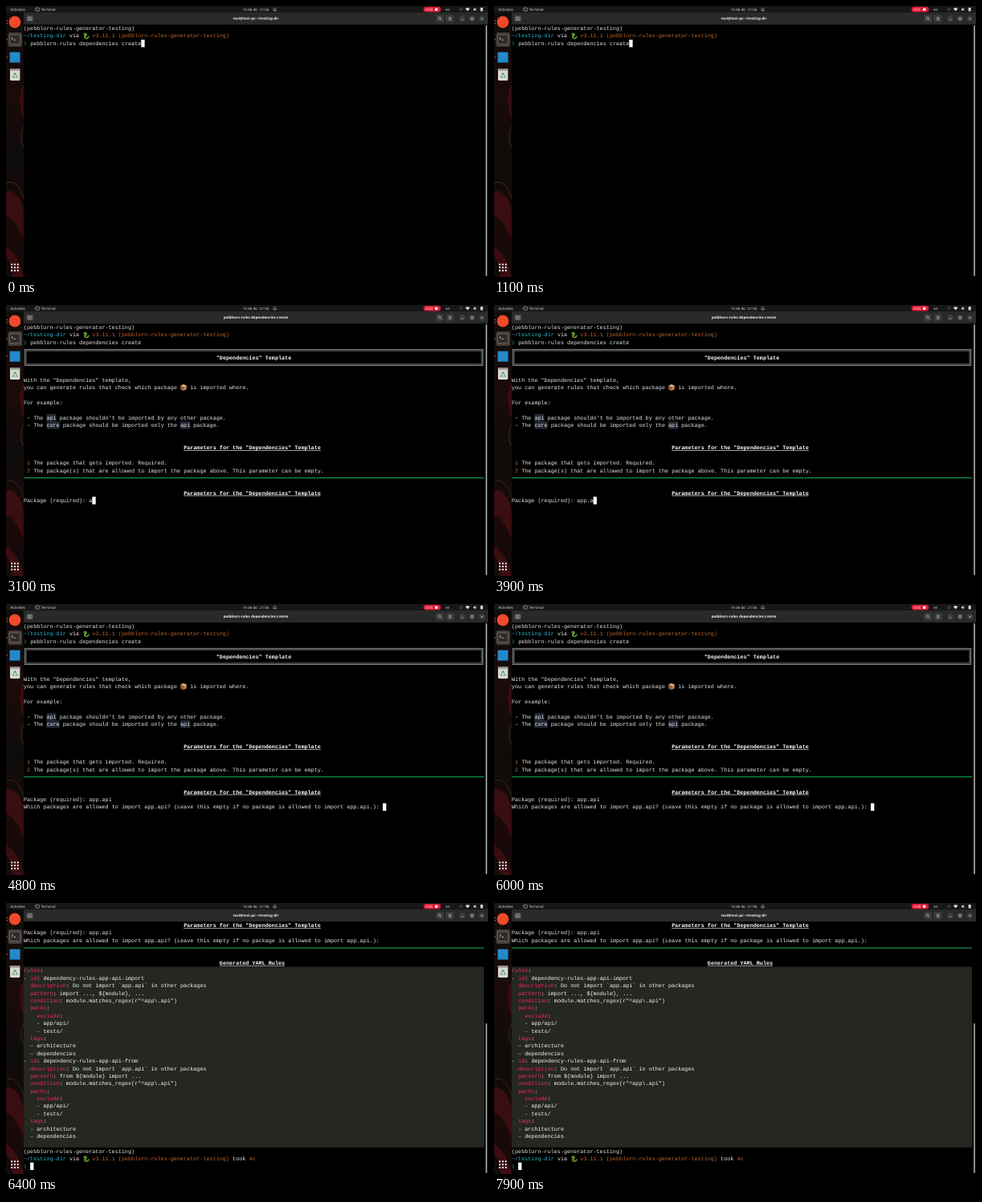
Write an HTML page that moves like this. It is 600 px wide and 338 px high and loops after 8100 ms.

```html
<!DOCTYPE html>
<html lang="en">
<head>
<meta charset="utf-8">
<title>Terminal session</title>
<style>
html, body { margin: 0; width: 100%; height: 100%; overflow: hidden; background: #000; }
svg { display: block; width: 100%; height: 100%; }
text { text-rendering: geometricPrecision; white-space: pre; }
.mono { font: 6.773px "Liberation Mono", monospace; }
.ui { font: 4.5px "Open Sans", "Noto Sans", sans-serif; fill: #e6e6e6; }
.bold { font-weight: 700; }
</style>
</head>
<body>
<svg viewBox="0 0 600 338">
  <defs>
    <linearGradient id="wall" x1="0" y1="0" x2="0" y2="1">
      <stop offset="0" stop-color="#100d0b"/>
      <stop offset=".3" stop-color="#1a0b0a"/>
      <stop offset=".55" stop-color="#0e0c0a"/>
      <stop offset=".85" stop-color="#1b0909"/>
      <stop offset="1" stop-color="#0e0b0a"/>
    </linearGradient>
    <clipPath id="dockClip"><rect y="8" width="22" height="330"/></clipPath>
    <clipPath id="termClip"><rect x="22" y="23.2" width="573.5" height="314.8"/></clipPath>
    <g id="snake" fill="none" stroke-linecap="round">
      <path d="M2 2.4C4 .4 6 2.4 4.2 4S2 6.6 4 7.2S7.4 6.8 7.6 5.4" stroke="#5f9e2f" stroke-width="1.7"/>
      <path d="M2.6 3.2C4 2.6 3.6 4.2 3 5" stroke="#e2b93b" stroke-width=".7"/>
    </g>
    <g id="box">
      <path d="M.3 2L4 .5L7.8 2V6.6L4 8.3L.3 6.6Z" fill="#b47a48"/>
      <path d="M.3 2L4 3.5V8.3L.3 6.6Z" fill="#8e5a34"/>
      <path d="M.3 2L4 .5L7.8 2L4 3.5Z" fill="#d2a06c"/>
      <path d="M2.2 1.2L5.9 2.7V4.2" fill="none" stroke="#ecd3a8" stroke-width=".7"/>
    </g>
  </defs>

  <rect width="600" height="338"/>

  <g clip-path="url(#dockClip)">
    <rect y="8" width="22" height="330" fill="url(#wall)"/>
    <path d="M22 98C14 112 18 130 22 142Z M0 232C8 226 20 240 22 258V292C14 270 4 262 0 262Z M0 300C9 306 18 318 22 338H8C7 322 2 314 0 312Z" fill="#3a0d10"/>
    <path d="M22 150C17 160 18 168 22 176M0 222C9 214 18 226 22 240" fill="none" stroke="#4a3a28" stroke-width=".7"/>
  </g>

  <g fill="#e0592a">
    <circle cx="1.4" cy="18.5" r=".8"/><circle cx="1.4" cy="21.8" r=".8"/>
    <circle cx="1.4" cy="42" r=".8"/><circle cx="1.4" cy="64" r=".8"/>
  </g>
  <circle cx="11" cy="20" r="7.4" fill="#f0482a"/>
  <rect x="2.6" y="33" width="17.4" height="18" rx="2.5" fill="#453d38"/>
  <rect x="4.6" y="36" width="13" height="11.6" rx="1.4" fill="#2e2b2b" stroke="#88807a" stroke-width=".6"/>
  <path d="M6.8 39.2l1.8 1.4l-1.8 1.4M9.6 42.4h2.4" fill="none" stroke="#eee" stroke-width=".7"/>
  <rect x="4.6" y="57.6" width="13" height="13" fill="#2489ca"/>
  <rect x="5" y="79" width="12.4" height="14" rx="1.6" fill="#d8d8d4"/>
  <rect x="4.6" y="78" width="13.2" height="2.6" rx="1" fill="#8e8e8a"/>
  <path d="M11.2 83.6L14 88.8H8.4Z" fill="none" stroke="#3c9a52" stroke-width="1.1" stroke-dasharray="3.6 1"/>
  <g id="apps" fill="#f2f2f2"></g>

  <rect width="600" height="8" fill="#171717"/>
  <text class="ui" x="5.5" y="5.9">Activities</text>
  <rect x="36.8" y="2.2" width="4.6" height="4" rx=".6" fill="none" stroke="#ccc" stroke-width=".6"/>
  <path d="M37.8 3.4l.9.8l-.9.8" fill="none" stroke="#ccc" stroke-width=".5"/>
  <text class="ui" x="43.4" y="5.9">Terminal</text>
  <text class="ui" x="311" y="5.9" text-anchor="middle">14 de dic  21:56</text>
  <path d="M332.6 5.4c.8-.8.4-3 2-3s1.200 2.200 2 3zM334 6.2h1.200" fill="none" stroke="#ccc" stroke-width=".6"/>
  <rect x="519.8" y="1" width="21.4" height="6.6" rx="3.300" fill="#df1b36"/>
  <text class="ui" id="timer" x="522.2" y="5.9" style="fill:#fff">0:00</text>
  <rect x="534" y="2.700" width="3.300" height="3.300" rx=".5" fill="#fff"/>
  <text class="ui" x="547.2" y="5.7">en</text>
  <circle cx="566.5" cy="4.200" r="1.500" fill="none" stroke="#777" stroke-width=".6"/>
  <path d="M571.800 3.200L574.600 6.400L577.400 3.200C575.800 1.800 573.400 1.800 571.800 3.200Z" fill="#ddd"/>
  <path d="M581.800 3.400h1.200l1.500-1.300v4.400l-1.500-1.300h-1.200zM585.500 3q1.200 1.300 0 2.600" fill="#ddd"/>
  <rect x="590.6" y="2" width="3" height="4.6" rx=".5" fill="#ddd"/>

  <rect x="22" y="8" width="578" height="15.2" fill="#292929"/>
  <rect x="24.600" y="11" width="10" height="9.600" rx="1.600" fill="#363636"/>
  <path d="M27 13.900h5.200v3.800H27zM29.600 14.800v2M28.600 15.800h2" fill="none" stroke="#ddd" stroke-width=".6"/>
  <text class="ui bold" id="title" x="311" y="17.2" text-anchor="middle" style="fill:#f2f2f2"></text>
  <g fill="#3a3a3a">
    <rect x="535" y="11" width="10" height="9.600" rx="1.600"/>
    <rect x="547.600" y="11" width="10" height="9.600" rx="1.600"/>
    <circle cx="568" cy="15.800" r="3.900"/><circle cx="580.200" cy="15.800" r="3.900"/><circle cx="592.400" cy="15.800" r="3.900"/>
  </g>
  <g fill="none" stroke="#ddd" stroke-width=".6">
    <circle cx="539.600" cy="15.300" r="1.500"/><path d="M540.700 16.400l1.500 1.500"/>
    <path d="M551 14.300h3.400M551 15.800h3.400M551 17.300h3.400"/>
    <path d="M566.600 17h2.800M578.900 14.500h2.600v2.600h-2.600zM591.200 14.600l2.400 2.400M593.600 14.600l-2.400 2.400"/>
  </g>

  <rect id="bar" x="597" width="2" rx="1" fill="#8c8c8c"/>
  <g clip-path="url(#termClip)">
    <g id="shell"></g>
    <g id="intro"></g>
    <g id="yaml"></g>
    <g id="done"></g>
    <rect id="cursor" width="4.3" height="9.39" fill="#fff"/>
  </g>
</svg>
<script>
const NS = 'http://www.w3.org/2000/svg';
const LOOP = 8100, CW = 4.064, RH = 9.39, X0 = 22, Y0 = 23.2, COLS = 141;
const WHITE = '#e8e8e8', CYAN = '#2ab5cf', ORANGE = '#c0672c', GREEN = '#18a558', PINK = '#f92672', CODE = '#f8f8f2';
const ENV = '(pebblorn-rules-generator-testing)';
const CMD = 'pebblorn-rules dependencies create';
const HOME = 'tovi@tovi-pc:~/testing-dir';
const PKG = 'app.api';
const PARAMS = 'Parameters for the "Dependencies" Template';
const ASK = 'Which packages are allowed to import app.api? (Leave this empty if no package is allowed to import app.api.):';

const $ = id => document.getElementById(id);
const colX = c => X0 + c * CW;
const rowY = r => Y0 + r * RH;

function add(parent, tag, attrs) {
  const el = document.createElementNS(NS, tag);
  for (const k in attrs) el.setAttribute(k, attrs[k]);
  return parent.appendChild(el);
}
const rect = (g, x, y, width, height, fill) => add(g, 'rect', { x, y, width, height, fill });

// Every word sits on the character grid.
function put(g, col, row, str, fill = WHITE, bold = false) {
  for (const m of str.matchAll(/\S+/g)) {
    add(g, 'text', { class: bold ? 'mono bold' : 'mono', x: colX(col + m.index), y: rowY(row) + 6.9, fill })
      .textContent = m[0];
  }
}
function heading(g, row, str) {
  const col = Math.floor((COLS - str.length) / 2);
  put(g, col, row, str, '#fff', true);
  rect(g, colX(col), rowY(row) + 7.8, str.length * CW, .7, '#ddd');
}
const rule = (g, row, fill) => rect(g, X0, rowY(row) + 4.1, COLS * CW, 1.1, fill);
function code(g, col, row, str) {
  rect(g, colX(col), rowY(row), str.length * CW, RH, '#222735');
  put(g, col, row, str);
}
function prompt(g, row) {
  put(g, 0, row, ENV);
  put(g, 0, row + 1, '~/testing-dir', CYAN);
  put(g, 14, row + 1, 'via');
  add(g, 'use', { href: '#snake', x: colX(18), y: rowY(row + 1) + .4 });
  put(g, 21, row + 1, 'v3.11.1 ' + ENV, ORANGE);
  add(g, 'path', {
    d: `M${X0 + 1} ${rowY(row + 2) + 2.4}l1.7 2.5l-1.7 2.5`,
    fill: 'none', stroke: GREEN, 'stroke-width': .8
  });
}

for (let i = 0; i < 9; i++) {
  add($('apps'), 'circle', { cx: 7.2 + i % 3 * 3.8, cy: 322.4 + Math.floor(i / 3) * 3.8, r: 1.15 });
}

const shell = $('shell');
prompt(shell, 0);
put(shell, 2, 2, CMD);

const intro = $('intro');
for (const d of [-.8, .9]) {
  add(intro, 'rect', {
    x: colX(.5) + d, y: rowY(3.5) + d, width: 140 * CW - 2 * d, height: 2 * RH - 2 * d,
    fill: 'none', stroke: '#b8b8b8', 'stroke-width': .7
  });
}
put(intro, 59, 4, '"Dependencies" Template', '#fff', true);
put(intro, 0, 7, 'With the "Dependencies" template,');
put(intro, 0, 8, 'you can generate rules that check which package');
add(intro, 'use', { href: '#box', x: colX(48), y: rowY(8) + .3 });
put(intro, 51, 8, 'is imported where.');
put(intro, 0, 10, 'For example:');
for (const r of [12, 13]) add(intro, 'circle', { cx: colX(1.5), cy: rowY(r) + 5, r: .8, fill: '#a98a58' });
put(intro, 3, 12, "The     package shouldn't be imported by any other package.");
code(intro, 7, 12, 'api');
put(intro, 3, 13, 'The      package should be imported only the     package.');
code(intro, 7, 13, 'core');
code(intro, 48, 13, 'api');
heading(intro, 16, PARAMS);
put(intro, 1, 18, '1', ORANGE);
put(intro, 3, 18, 'The package that gets imported. Required.');
put(intro, 1, 19, '2', ORANGE);
put(intro, 3, 19, 'The package(s) that are allowed to import the package above. This parameter can be empty.');
rule(intro, 20, GREEN);
heading(intro, 22, PARAMS);
put(intro, 0, 23, 'Package (required):');
const typed = add(intro, 'text', { class: 'mono', x: colX(20), y: rowY(23) + 6.9, fill: WHITE });
const ask = add(intro, 'g', {});
put(ask, 0, 24, ASK);

const yaml = $('yaml');
rule(yaml, 0, GREEN);
heading(yaml, 2, PARAMS);
put(yaml, 0, 3, 'Package (required): ' + PKG);
put(yaml, 0, 4, ASK);
const lower = rule(yaml, 5, '#8d8d8d');
heading(yaml, 7, 'Generated YAML Rules');
rect(yaml, X0, rowY(8), COLS * CW, 24 * RH, '#252720');
const entry = (kind, pattern) => [
  `- id: dependency-rules-app-api-${kind}`,
  '  description: Do not import `app.api` in other packages',
  `  pattern: ${pattern}`,
  '  condition: module.matches_regex(r"^app\\.api")',
  '  paths:', '    exclude:', '    - app/api/', '    - tests/',
  '  tags:', '  - architecture', '  - dependencies'
];
['rules:', ...entry('import', 'import ..., ${module}, ...'), ...entry('from', 'from ${module} import ...')]
  .forEach((line, i) => {
    const [, lead, key, rest] = line.match(/^([ -]*)(\w+(?=:))?(.*)$/);
    put(yaml, 0, 8 + i, lead, CODE);
    if (key) put(yaml, lead.length, 8 + i, key, PINK);
    put(yaml, lead.length + (key || '').length, 8 + i, rest, CODE);
  });

const done = $('done');
prompt(done, 30);
put(done, 64, 31, 'took');
put(done, 69, 31, '4s', ORANGE);

// [start ms, column, row, visible]
const CURSOR = [
  [0, 36, 2, 1], [500, 36, 2, 0], [1100, 36, 2, 1], [1700, 36, 2, 0],
  [1800, 0, 3, 1], [2000, 20, 23, 1], [2400, 20, 23, 0], [3000, 20, 23, 1],
  [3100, 21, 23, 1], [3200, 22, 23, 1], [3400, 23, 23, 1], [3700, 24, 23, 1],
  [3900, 25, 23, 1], [4000, 26, 23, 1], [4100, 27, 23, 1], [4700, 27, 23, 0],
  [4800, 110, 24, 1], [5400, 110, 24, 0], [6000, 110, 24, 1],
  [6300, 0, 32, 1], [6400, 2, 32, 1], [6900, 2, 32, 0], [7500, 2, 32, 1]
];
const show = (el, on) => el.setAttribute('visibility', on ? 'visible' : 'hidden');

function draw(t) {
  const [, col, row, on] = CURSOR.findLast(s => s[0] <= t);
  const output = t >= 6300, ended = t >= 6400;
  $('cursor').setAttribute('x', colX(col));
  $('cursor').setAttribute('y', rowY(row));
  show($('cursor'), on);

  show(shell, !output);
  show(intro, t >= 2000 && !output);
  show(ask, t >= 4800 && !output);
  show(yaml, output);
  show(done, ended);
  typed.textContent = row === 23 ? PKG.slice(0, col - 20) : PKG;
  yaml.setAttribute('transform', `translate(0 ${ended ? -2 * RH : 0})`);
  lower.setAttribute('fill', ended ? GREEN : '#8d8d8d');

  $('title').textContent = t >= 1800 && !ended ? CMD : HOME;
  $('timer').textContent = '0:0' + Math.floor((t + 100) / 1000);
  const top = ended ? 150 : output ? 142 : 24;
  $('bar').setAttribute('y', top);
  $('bar').setAttribute('height', 337 - top);
}

function tick() {
  draw(performance.now() % LOOP);
  requestAnimationFrame(tick);
}
tick();
</script>
</body>
</html>
```
